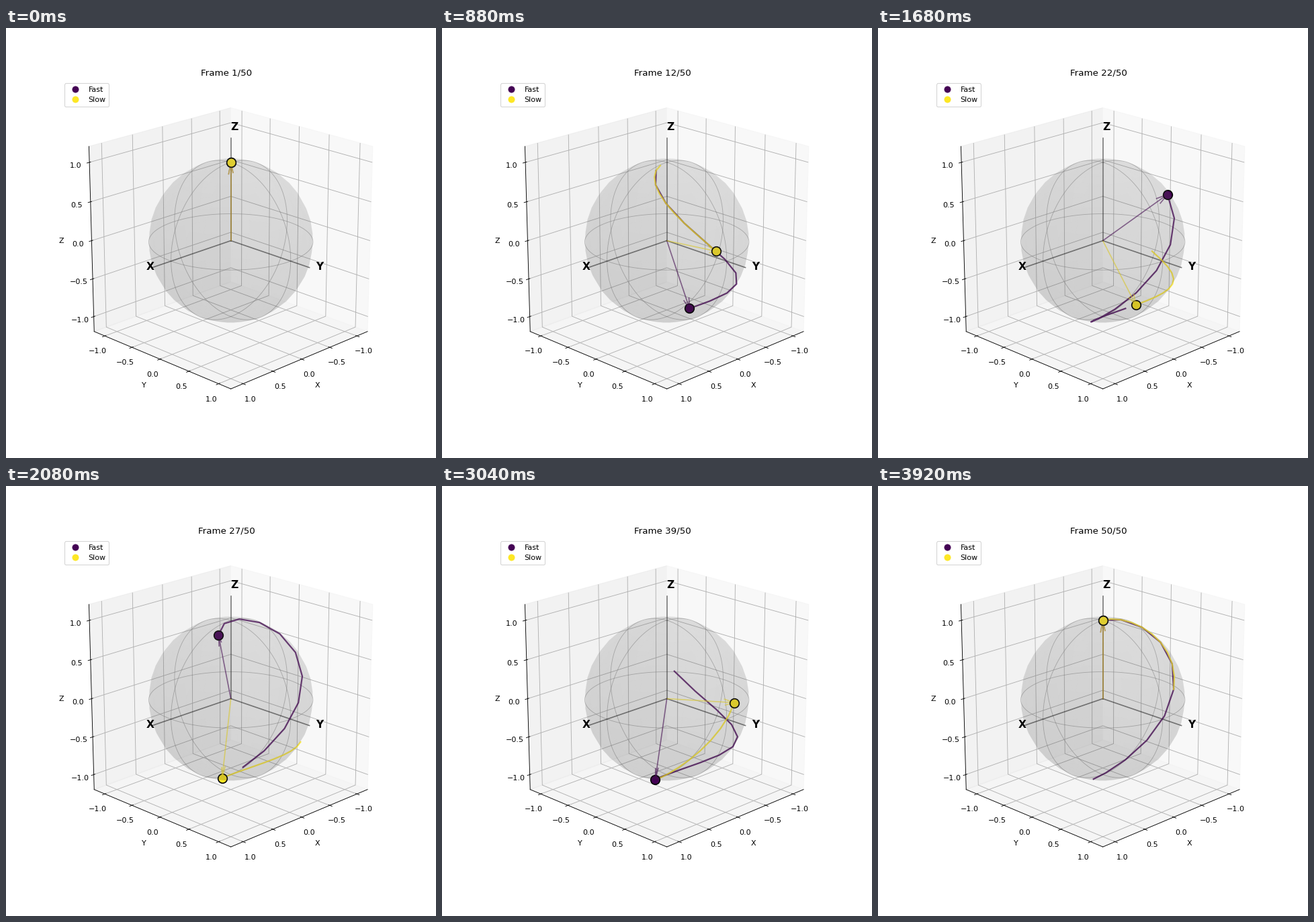
Write a matplotlib script that moves like this. It is 640 by 640 pixels and loops after 4 s.

```python
import numpy as np
import matplotlib.pyplot as plt
from matplotlib.animation import FuncAnimation
from matplotlib.lines import Line2D

FRAMES = 50
INTERVAL = 80
TRAIL = 10
NAMES = ["Fast", "Slow"]
SPEEDS = [2, 1]
COLORS = plt.cm.viridis([0.0, 1.0])


def curve(t):
    """Closed path on the unit sphere with equal polar and azimuth angles."""
    return np.array([np.sin(t) * np.cos(t), np.sin(t) ** 2, np.cos(t)])


time = np.linspace(0, 2 * np.pi, FRAMES)
paths = [curve(speed * time) for speed in SPEEDS]

fig = plt.figure(figsize=(8, 8), dpi=80)
ax = fig.add_subplot(111, projection="3d")
ax.set_box_aspect([1, 1, 1])
ax.view_init(elev=20, azim=45)


def draw_sphere():
    u = np.linspace(0, 2 * np.pi, 30)
    v = np.linspace(0, np.pi, 20)
    ax.plot_surface(np.outer(np.cos(u), np.sin(v)),
                    np.outer(np.sin(u), np.sin(v)),
                    np.outer(np.ones_like(u), np.cos(v)),
                    color="gray", alpha=0.1)

    a = np.linspace(0, 2 * np.pi, 100)
    c, s, zero = np.cos(a), np.sin(a), np.zeros_like(a)
    for ring in [(c, s, zero), (c, zero, s), (zero, c, s)]:
        ax.plot(*ring, color="gray", alpha=0.5, linewidth=0.8)


def draw_axes():
    for name, unit in zip("XYZ", np.eye(3)):
        ax.plot(*np.outer(unit, [0, 1.3]), color="black", alpha=0.5,
                linewidth=1.5)
        ax.text(*(1.4 * unit), name, fontsize=14, fontweight="bold")
    ax.set(xlim=(-1.2, 1.2), ylim=(-1.2, 1.2), zlim=(-1.2, 1.2),
           xlabel="X", ylabel="Y", zlabel="Z")


def draw_legend():
    handles = [Line2D([0], [0], marker="o", color="w", markerfacecolor=color,
                      markersize=10, label=name)
               for name, color in zip(NAMES, COLORS)]
    ax.legend(handles=handles, loc="upper left")


draw_sphere()
draw_axes()
draw_legend()
moving = []


def update(i):
    while moving:
        moving.pop().remove()
    for path, color in zip(paths, COLORS):
        tip = path[:, i]
        trail = path[:, max(0, i - TRAIL):i + 1]
        moving.extend(ax.plot(*trail, color=color, alpha=0.8, linewidth=2))
        moving.append(ax.quiver(0, 0, 0, *tip, color=color, alpha=0.6,
                                linewidth=1.5, arrow_length_ratio=0.15))
        moving.append(ax.scatter(*tip[:, None], color=[color], s=150,
                                 edgecolors="black", linewidth=1.5))
    # Keep the view fixed whatever the new artists span.
    ax.set(xlim=(-1.2, 1.2), ylim=(-1.2, 1.2), zlim=(-1.2, 1.2))
    ax.set_title(f"Frame {i + 1}/{FRAMES}")
    return moving


anim = FuncAnimation(fig, update, frames=FRAMES, interval=INTERVAL,
                     init_func=lambda: update(0), blit=False, repeat=True)
plt.show()
```
